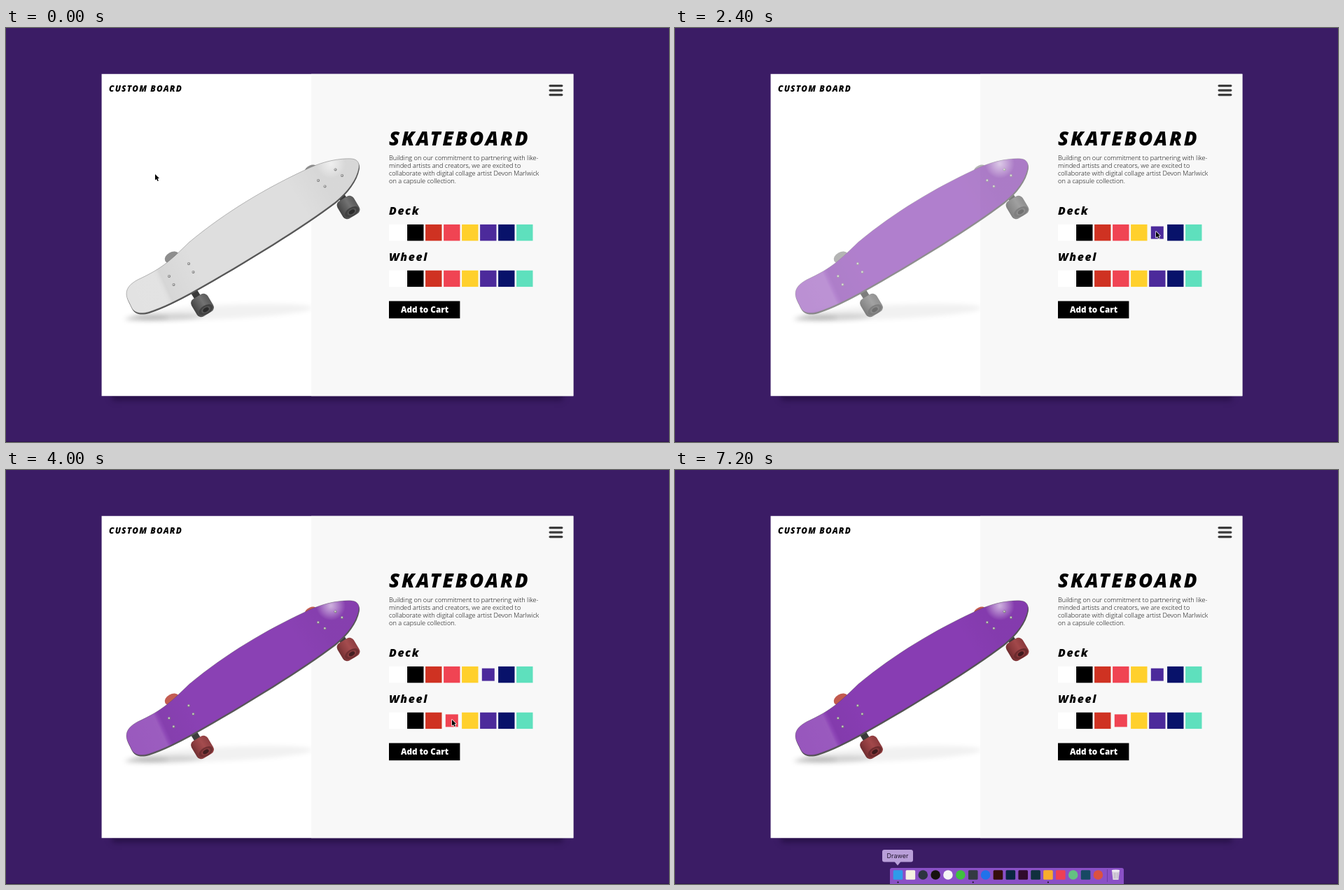
An HTML page with a canvas that plays this animation: 947x592 px, repeating every 7400 ms.

```html
<!DOCTYPE html>
<html lang="en">
<head>
<meta charset="utf-8">
<title>Custom Board</title>
<style>
html, body { margin: 0; width: 100%; height: 100%; overflow: hidden; background: #3b1c65; }
canvas { display: block; }
</style>
</head>
<body>
<canvas id="stage" width="947" height="592"></canvas>
<script>
const W = 947, H = 592, LOOP = 7400, STEP = 100;
const ctx = document.getElementById('stage').getContext('2d');

const SWATCHES = ['#ffffff', '#000000', '#cf3222', '#f04453', '#ffd02c', '#4c2a9b', '#08126a', '#5ee0bd'];
const DECK = { grey: '#dedede', purple: '#883db3' };
const WHEEL = {
  grey: { light: '#727272', body: '#575757', face: '#424242', hub: '#2b2b2b', back: '#8e8e8e' },
  red: { light: '#a2484a', body: '#8a393c', face: '#6d2b2e', hub: '#401a1d', back: '#c25a4f' }
};
const DECK_PICK = 2100, WHEEL_PICK = 3550, FADE = 500;
const TILT = -Math.atan2(193, 320);

const deckPath = new Path2D(`M172 380 C172 371 179 365 188 360 C225 343 236 331 262 306
  C315 262 372 229 425 204 C452 190 478 186 494 187 C503 188 505 194 504 200
  C501 217 488 234 470 249 C425 283 345 333 265 378 C245 389 225 399 204 406
  C190 410 182 406 179 399 C176 392 172 387 172 380Z`);
const arrowPath = new Path2D('M0 0 V8.6 L2 6.9 L3.5 10 L4.9 9.3 L3.5 6.3 L6 6Z');

// Pointer moves; a move with "via" follows a cubic curve.
const REST = [213, 209];
const MOVES = [
  { start: 600, end: 1300, to: [705, 245], via: [[500, 95], [943, -145]] },
  { start: 1300, end: 1600, to: [687, 291] },
  { start: 2940, end: 3500, to: [637, 357] },
  { start: 6500, end: 6900, to: [318, 596] }
];

const clamp = v => Math.max(0, Math.min(1, v));
const swing = v => .5 - Math.cos(Math.PI * clamp(v)) / 2;
const mix = (a, b, k) => a.map((v, i) => v + (b[i] - v) * k);

// De Casteljau evaluation of a Bezier curve of any degree.
function bezier(points, k) {
  while (points.length > 1) points = points.slice(1).map((p, i) => mix(points[i], p, k));
  return points[0];
}

function rect(g, x, y, w, h, color, r = 0) {
  g.fillStyle = color;
  g.beginPath();
  g.roundRect(x, y, w, h, r);
  g.fill();
}

function oval(g, x, y, rx, ry, color, turn = 0) {
  g.fillStyle = color;
  g.beginPath();
  g.ellipse(x, y, rx, ry, turn, 0, Math.PI * 2);
  g.fill();
}

function polygon(g, points, color) {
  g.fillStyle = color;
  g.beginPath();
  points.forEach(p => g.lineTo(...p));
  g.fill();
}

function text(g, str, x, y, font, color = '#000', spacing = 0, align = 'left') {
  g.font = font;
  g.letterSpacing = spacing + 'px';
  g.textAlign = align;
  g.fillStyle = color;
  g.fillText(str, x, y);
}

function heading(g, str, y, size) {
  text(g, str, 547, y, `italic 800 ${size}px "Open Sans", sans-serif`, '#000', size / 10);
}

function layer(draw) {
  const canvas = document.createElement('canvas');
  canvas.width = W;
  canvas.height = H;
  draw(canvas.getContext('2d'));
  return canvas;
}

function fillStops(fill, stops) {
  stops.forEach(([at, color]) => fill.addColorStop(at, color));
  return fill;
}

function drawWheel(g, x, y, tone) {
  g.save();
  g.translate(x, y);
  g.rotate(TILT);
  rect(g, -5, -23, 10, 12, '#3a3a3a');
  const drum = fillStops(g.createLinearGradient(-14, 0, 14, 0),
    [[0, tone.face], [.25, tone.body], [.6, tone.light], [1, tone.body]]);
  rect(g, -13.5, -14.5, 27, 29, drum, 7);
  oval(g, 1, 8, 11, 6.3, tone.face);
  oval(g, 1, 8, 7, 4.2, tone.body);
  oval(g, 1, 8, 4.6, 2.8, tone.hub);
  g.restore();
}

function drawBolts(g, x, y, along, across) {
  for (let i = 0; i < 4; i++) {
    const u = i >> 1, v = i & 1;
    const bx = x + u * along[0] + v * across[0], by = y + u * along[1] + v * across[1];
    oval(g, bx, by, 2, 2, '#777');
    oval(g, bx - .2, by - .2, 1.3, 1.3, '#c5c5c5');
  }
}

function drawDeck(g, color) {
  g.save();
  g.translate(.8, 2);
  g.fillStyle = '#555';
  g.fill(deckPath);
  g.restore();

  g.save();
  g.clip(deckPath);
  rect(g, 160, 180, 360, 240, color);
  const fold = fillStops(g.createLinearGradient(170, 384, 270, 338), [
    [0, 'rgba(255,255,255,.13)'], [.46, 'rgba(255,255,255,.15)'], [.5, 'rgba(255,255,255,.04)'],
    [.54, 'rgba(0,0,0,.035)'], [1, 'rgba(0,0,0,0)']]);
  rect(g, 160, 180, 360, 240, fold);
  rect(g, 160, 180, 360, 240, fillStops(g.createLinearGradient(412, 240, 450, 217),
    [[0, 'rgba(0,0,0,0)'], [1, 'rgba(0,0,0,.03)']]));
  rect(g, 440, 180, 50, 40, fillStops(g.createRadialGradient(464, 194, 1, 464, 194, 21),
    [[0, 'rgba(255,255,255,.58)'], [.4, 'rgba(255,255,255,.36)'], [1, 'rgba(255,255,255,0)']]));
  g.restore();

  g.strokeStyle = 'rgba(70,70,70,.5)';
  g.lineWidth = .7;
  g.stroke(deckPath);
  drawBolts(g, 233, 355, [28, -18], [6.5, 12]);
  drawBolts(g, 446, 218, [24.5, -15.5], [9.5, 8.5]);
}

const makeBoard = (deck, wheel) => layer(g => {
  const tone = WHEEL[wheel];
  oval(g, 237, 328, 11, 7.5, tone.back, -.5);
  oval(g, 435, 201, 8.5, 4.5, tone.back, -.45);
  drawWheel(g, 280.5, 396.5, tone);
  drawWheel(g, 489, 256.5, tone);
  drawDeck(g, DECK[deck]);
});

const boards = {
  plain: makeBoard('grey', 'grey'),
  deck: makeBoard('purple', 'grey'),
  both: makeBoard('purple', 'red')
};

const page = layer(g => {
  rect(g, 0, 0, W, H, '#3b1c65');
  rect(g, 0, 591, W, 1, '#2e144f');
  g.save();
  g.shadowColor = 'rgba(18,4,40,.5)';
  g.shadowBlur = 8;
  g.shadowOffsetY = 4;
  rect(g, 152, 100, 643, 428, '#2d1450');
  g.restore();
  rect(g, 136.6, 65.7, 673.8, 460.6, '#fff');
  rect(g, 436, 65.7, 374.4, 460.6, '#f8f8f8');

  text(g, 'CUSTOM BOARD', 147, 91, 'italic 800 11.84px "Open Sans", sans-serif', '#000', 1.18);
  for (let i = 0; i < 3; i++) rect(g, 775.5, 81 + i * 6.5, 20, 3.2, '#3c3c3c', 1.6);
  heading(g, 'SKATEBOARD', 168, 27.6);
  [
    'Building on our commitment to partnering with like-',
    'minded artists and creators, we are excited to',
    'collaborate with digital collage artist Devon Marlwick',
    'on a capsule collection.'
  ].forEach((line, i) => text(g, line, 547, 188.6 + i * 11.2, '300 9.21px "Open Sans", sans-serif'));
  heading(g, 'Deck', 267, 15.8);
  heading(g, 'Wheel', 333, 15.8);
  rect(g, 547, 390.6, 101.4, 24.6, '#000');
  text(g, 'Add to Cart', 598, 407, '800 11.7px "Open Sans", sans-serif', '#fff', 0, 'center');

  g.save();
  g.beginPath();
  g.rect(137, 66, 299, 460);
  g.clip();
  g.filter = 'blur(3px)';
  oval(g, 310, 406, 128, 10, 'rgba(0,0,0,.055)', -.045);
  oval(g, 225, 414, 56, 5, 'rgba(0,0,0,.13)', -.04);
  oval(g, 203, 414, 28, 3, 'rgba(0,0,0,.13)');
  g.restore();
});

const dock = layer(g => {
  rect(g, 307, 569, 334, 30, '#8a50c6', 3);
  // Each icon: colour, and whether it is round.
  [
    ['#2f9bea'], ['#f6f2e2'], ['#2c3440', 1], ['#17120e', 1], ['#f5f5f5', 1], ['#3fc13f', 1], ['#333a42'],
    ['#2072ea', 1], ['#350d0b'], ['#0a2740'], ['#300b2d'], ['#10303d'], ['#f8ad2d'], ['#ee4055'],
    ['#64c282', 1], ['#174963'], ['#dc5140', 1]
  ].forEach(([color, round], i) => {
    const x = 318.5 + i * 17.87;
    rect(g, x - 6.8, 572.2, 13.6, 13.6, color, round ? 6.8 : 1.5);
    if (i % 6 === 0) oval(g, x, 589.5, 1.1, 1.1, '#111');
  });
  rect(g, 617, 571, 1, 18, '#6e3ca4');
  polygon(g, [[624, 573], [635, 573], [633.5, 586], [625.5, 586]], '#d9d3df');
  oval(g, 629.5, 573, 5.8, 1.6, '#f1edf4');
  for (let x = 627; x < 633; x += 2.5) rect(g, x, 576, .7, 8, '#aaa1b4');
});

function drawSwatches(y, picked) {
  SWATCHES.forEach((color, i) => {
    const inset = i === picked ? 2.7 : 0, size = 23.4 - 2 * inset;
    rect(ctx, 547.1 + i * 26 + inset, y + inset, size, size, color);
  });
}

function drawBoard(t) {
  const [board, since] = t >= WHEEL_PICK ? [boards.both, WHEEL_PICK]
    : t >= DECK_PICK ? [boards.deck, DECK_PICK] : [boards.plain, -FADE];
  ctx.globalAlpha = swing((t - since) / FADE);
  ctx.drawImage(board, 0, 0);
  ctx.globalAlpha = 1;
}

function drawDock(t) {
  const rise = swing((t - 6800) / 300);
  if (!rise) return;
  ctx.drawImage(dock, 0, 24 * (1 - rise));
  if (t < 7100) return;
  rect(ctx, 296, 543, 44, 17.5, '#b99fd9', 3);
  polygon(ctx, [[313.5, 560], [322.5, 560], [318, 565.5]], '#b99fd9');
  text(ctx, 'Drawer', 318, 555.2, '9px Inter, sans-serif', '#21152e', 0, 'center');
}

function pointerAt(t) {
  return MOVES.reduce((from, { start, end, to, via = [] }) =>
    t < start ? from : bezier([from, ...via, to], swing((t - start) / (end - start))), REST);
}

function drawPointer(t) {
  ctx.save();
  ctx.translate(...pointerAt(t));
  ctx.lineWidth = 1.4;
  ctx.lineJoin = 'round';
  ctx.strokeStyle = '#fff';
  ctx.stroke(arrowPath);
  ctx.fillStyle = '#000';
  ctx.fill(arrowPath);
  ctx.restore();
}

function render(now) {
  const t = Math.min(7200, Math.floor(now % LOOP / STEP) * STEP);
  ctx.drawImage(page, 0, 0);
  drawSwatches(280.9, t >= DECK_PICK ? 5 : -1);
  drawSwatches(346.7, t >= WHEEL_PICK ? 3 : -1);
  drawBoard(t);
  drawDock(t);
  drawPointer(t);
}

const start = performance.now();
function tick() {
  render(performance.now() - start);
  requestAnimationFrame(tick);
}
tick();
</script>
</body>
</html>
```
